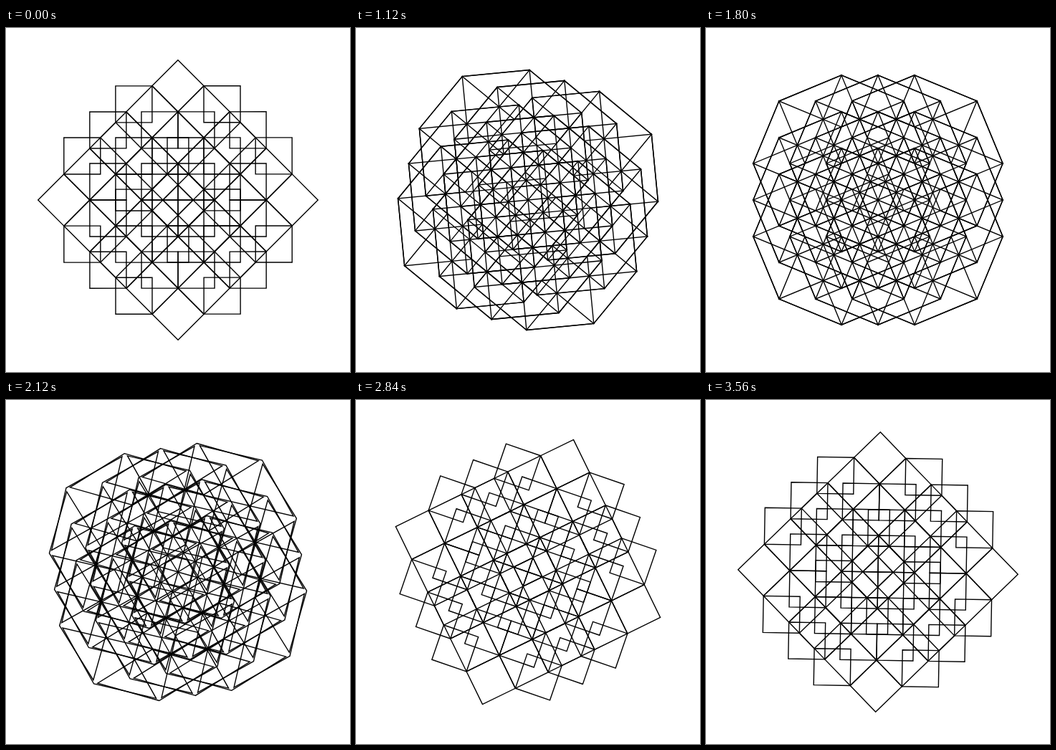
An HTML page with a canvas for the animation above (3600 ms loop, 480x480 px).

```html
<!DOCTYPE html>
<html lang="en">
<head>
<meta charset="utf-8">
<title>Rhombus lattice</title>
<style>
  html, body { margin: 0; width: 100%; height: 100%; overflow: hidden; background: #fff; }
  canvas { display: block; width: 480px; height: 480px; }
</style>
</head>
<body>
<canvas width="480" height="480"></canvas>
<script>
const ctx = document.querySelector('canvas').getContext('2d');
const LOOP = 3600, MORPH = 1080;
const SIDE = 51;                          // square side and lattice spacing
const HALF = SIDE / Math.SQRT2;           // half diagonal of a square
const RING = HALF * (1 + Math.SQRT2);     // distance of the rhombi from their hub

function ease(x) {
  x = Math.min(1, Math.max(0, x));
  return x < 0.5 ? 4 * x ** 3 : 1 - 4 * (1 - x) ** 3;
}

// Squares widen into rhombi until neighbours share their tips.
function halfWidth(t) {
  const spread = ease(t / MORPH) - ease((t - LOOP / 2) / MORPH);
  return HALF + (RING - HALF) * spread;
}

function rosette(cx, cy, width) {
  for (let i = 0; i < 8; i++) {
    const c = Math.cos(i * Math.PI / 4), s = Math.sin(i * Math.PI / 4);
    const corners = [[RING + HALF, 0], [RING, width], [RING - HALF, 0], [RING, -width]];
    ctx.beginPath();
    for (const [u, v] of corners) ctx.lineTo(cx + u * c - v * s, cy + u * s + v * c);
    ctx.closePath();
    ctx.stroke();
  }
}

function draw() {
  const t = performance.now() % LOOP;
  const width = halfWidth(t);
  ctx.setTransform(1, 0, 0, 1, 0, 0);
  ctx.fillStyle = '#fff';
  ctx.fillRect(0, 0, 480, 480);
  ctx.translate(240, 240);
  ctx.rotate(Math.PI / 4 - Math.PI / 2 * t / LOOP);
  ctx.strokeStyle = '#000';
  ctx.lineWidth = 1.4;
  for (let x = -1; x <= 1; x++)
    for (let y = -1; y <= 1; y++) rosette(x * SIDE, y * SIDE, width);
  requestAnimationFrame(draw);
}
draw();
</script>
</body>
</html>
```
